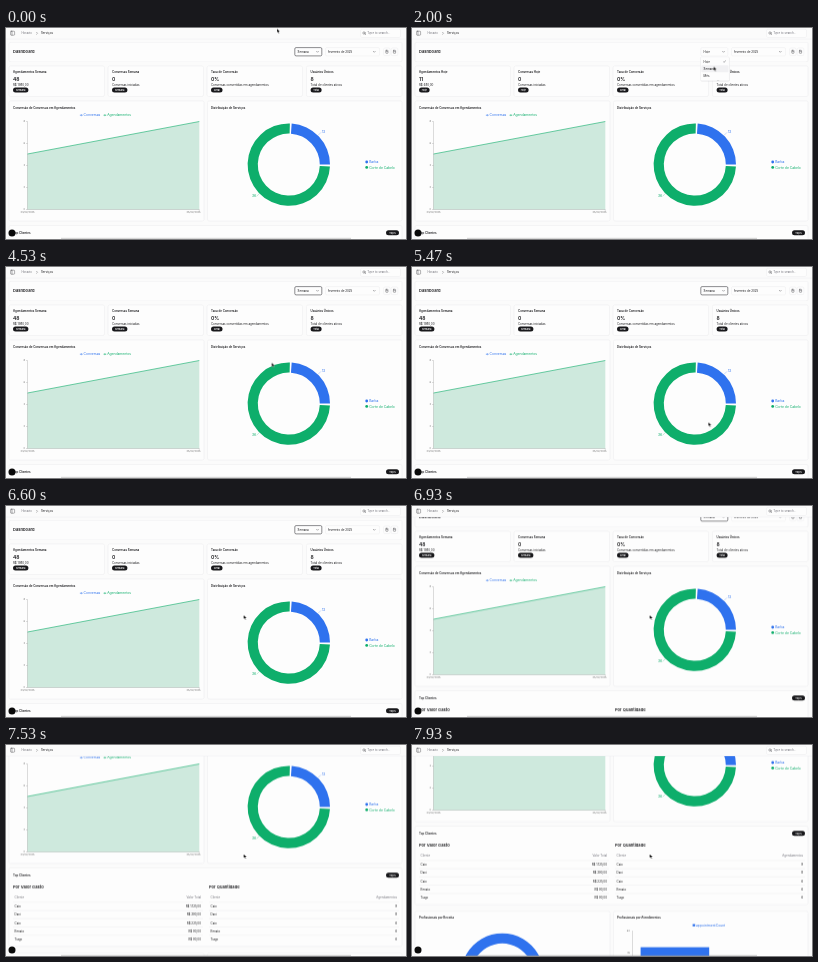
Animation, 400 px wide and 211 px high, one loop 8000 ms. Source, as an HTML page:

```html
<!DOCTYPE html>
<html lang="pt-BR">
<head>
<meta charset="utf-8">
<title>Dashboard</title>
<style>
  html, body { margin: 0; width: 100%; height: 100%; overflow: hidden; background: #fbfbfb; }
  svg { display: block; width: 100vw; height: 100vh; font: 2.92px Inter, sans-serif; fill: #18181b; }
  .b { font-weight: 600; }
  .mute { fill: #71717a; }
  .blue { fill: #2f72ee; }
  .green { fill: #0eae6b; }
  .white { fill: #fff; }
  .card { fill: #fdfdfd; stroke: #e4e4e7; stroke-width: .35; }
  .line { fill: none; stroke: #e4e4e7; stroke-width: .3; }
  .icon { fill: none; stroke: #3f3f46; stroke-width: .4; stroke-linecap: round; stroke-linejoin: round; }
  .axis { fill: none; stroke: #777; stroke-width: .25; }
  .legend { font-size: 3.33px; }
  .tick { font-size: 2.5px; fill: #777; }
  .end { text-anchor: end; }
  .mid { text-anchor: middle; }

  .week, .today, .menu, .open2, .tip, .focus, #page, #cursor { animation: 8s linear infinite; }
  .week, .today, .menu, .open2, .focus { animation-timing-function: step-end; }
  .week { animation-name: week; }
  .today { animation-name: today; }
  .menu { animation-name: menu; }
  .open2 { animation-name: open2; }
  .focus { animation-name: focus; }
  .tip { animation-name: tip; }
  #page { animation-name: scroll; }
  #cursor { animation-name: point; }

  @keyframes week { 0% { opacity: 1 } 13.4% { opacity: 0 } 29.2% { opacity: 1 } }
  @keyframes today { 0% { opacity: 0 } 13.4% { opacity: 1 } 29.2% { opacity: 0 } }
  @keyframes menu { 0% { opacity: 0 } 7.5% { opacity: 1 } 13.4% { opacity: 0 } 21.7% { opacity: 1 } 29.2% { opacity: 0 } }
  @keyframes focus { 0% { opacity: 1 } 7.5% { opacity: 0 } 13.4% { opacity: 1 } 21.7% { opacity: 0 } 29.2% { opacity: 1 } }
  @keyframes open2 { 0% { transform: translateY(0) } 10.8% { transform: translateY(-7.2px) } 21.7% { transform: translateY(-7.2px) } 23.4% { transform: translateY(0) } }
  @keyframes tip {
    0%, 34.2% { opacity: 0; transform: translateY(-12px) }
    35.8% { opacity: 1; transform: translateY(-8px) }
    39%, 52% { opacity: 1; transform: none }
    53.3%, 100% { opacity: 0; transform: translateY(-3px) }
  }
  @keyframes scroll {
    0%, 83.3% { transform: none; animation-timing-function: cubic-bezier(.35, 0, .8, .7) }
    90% { transform: translateY(-39.7px) }
    99.1%, 100% { transform: translateY(-116.4px) }
  }
  @keyframes point {
    0%, .9% { transform: translate(271px, .6px); animation-timing-function: ease-in-out }
    5.8%, 8.1% { transform: translate(302px, 23px); animation-timing-function: ease-in-out }
    11.6%, 14.4% { transform: translate(300px, 32px); animation-timing-function: ease-in-out }
    18.5%, 21.9% { transform: translate(302px, 23px); animation-timing-function: ease-in-out }
    24.6%, 29.4% { transform: translate(301.6px, 38.5px); animation-timing-function: ease-in }
    33.4% { transform: translate(190px, 92px); animation-timing-function: ease-out }
    38.5% { transform: translate(152px, 112px); animation-timing-function: ease-in-out }
    44%, 49% { transform: translate(157.8px, 111.3px); animation-timing-function: ease-in-out }
    56.3%, 58% { transform: translate(265.6px, 95.6px); animation-timing-function: ease-in }
    62% { transform: translate(305px, 110px) }
    66.5% { transform: translate(311px, 148px) }
    71% { transform: translate(276px, 165px) }
    75.5% { transform: translate(250px, 142px); animation-timing-function: ease-out }
    79.1%, 100% { transform: translate(237.6px, 109px) }
  }
</style>
</head>
<body>
<svg viewBox="0 0 400 211" preserveAspectRatio="none">
  <defs>
    <linearGradient id="shade" x2="0" y2="1">
      <stop stop-color="#999" stop-opacity="0"/>
      <stop offset="1" stop-color="#999" stop-opacity=".55"/>
    </linearGradient>
  </defs>
  <rect width="400" height="211" fill="#fbfbfb"/>
  <g id="page"></g>

  <g id="header">
    <rect width="400" height="11" fill="#fbfbfb"/>
    <path class="line" d="M0 11H400"/>
    <rect class="icon" x="4.6" y="3.2" width="4" height="4" rx=".6"/>
    <path class="icon" d="M6 3.2v4"/>
    <text class="mute" x="15.4" y="6.4">Horavix</text>
    <path class="icon" d="M30.6 4.4l.9 .9-.9 .9"/>
    <text x="35" y="6.4">Serviços</text>
    <rect class="card" x="354.5" y="1.2" width="40" height="8.3" rx="1.5"/>
    <circle class="icon" cx="358" cy="5" r="1.2"/>
    <path class="icon" d="M358.9 5.9l.8 .8"/>
    <text class="mute" x="361.3" y="6.4">Type to search...</text>
  </g>

  <circle cx="6" cy="205" r="3.5" fill="#0a0a0a"/>
  <rect x="55" y="209.2" width="290" height="1.8" fill="url(#shade)"/>
  <path id="cursor" d="M0 0V4.1L1 3.2 1.7 4.7 2.4 4.4 1.7 3H3Z" fill="#000" stroke="#fff" stroke-width=".3"/>
</svg>
<script>
const text = (x, y, s, cls = '', size) =>
  `<text x="${x}" y="${y}" class="${cls}"${size ? ` style="font-size:${size}px"` : ''}>${s}</text>`;
const rect = (x, y, w, h, cls, r = 0) =>
  `<rect x="${x}" y="${y}" width="${w}" height="${h}" rx="${r}" class="${cls}"/>`;
const path = (d, cls) => `<path d="${d}" class="${cls}"/>`;
const card = (x, y, w, h) => rect(x, y, w, h, 'card', 1.6);
const pill = (x, y, w, s) =>
  rect(x, y, w, 5, '', 2.5) + text(x + w / 2, y + 3.4, s, 'white b mid', 2.4);
const chevron = (x, y) => path(`M${x} ${y}l1 1 1-1`, 'icon');
const byPeriod = draw =>
  `<g class="week">${draw('Semana')}</g><g class="today">${draw('Hoje')}</g>`;

// Ring slice; angles in degrees, counterclockwise from the right.
function slice(cx, cy, from, to, cls, outer = 41.2, inner = 31) {
  const at = (r, a) => {
    const t = a * Math.PI / 180;
    return `${(cx + r * Math.cos(t)).toFixed(2)} ${(cy - r * Math.sin(t)).toFixed(2)}`;
  };
  const big = to - from > 180 ? 1 : 0;
  return path(`M${at(outer, from)}A${outer} ${outer} 0 ${big} 0 ${at(outer, to)}` +
    `L${at(inner, to)}A${inner} ${inner} 0 ${big} 1 ${at(inner, from)}Z`, cls);
}

function toolbar() {
  return card(3, 14.3, 393, 19.5) + text(7, 25.3, 'Dashboard', 'b', 4.1) +
    rect(288.8, 19.6, 27, 8.3, 'card', 1.3) +
    '<rect class="focus" x="288.8" y="19.6" width="27" height="8.3" rx="1.3" fill="none" stroke="#27272a" stroke-width=".5"/>' +
    byPeriod(p => text(291.6, 24.8, p)) + chevron(310.5, 23.3) +
    rect(319.5, 19.6, 54, 8.3, 'card', 1.3) + text(322, 24.8, 'fevereiro de 2025') + chevron(367.3, 23.3) +
    [377.6, 385.2].map(x => rect(x, 20, 6.6, 7.6, 'card', 1.3) +
      rect(x + 2.2, 22.3, 2.2, 3, 'icon', .4) + path(`M${x + 2.6} 23.6h1.4`, 'icon')).join('');
}

function stats() {
  const week = { Semana: ['48', 'R$ 1980,00', 15.4], Hoje: ['11', 'R$ 480,00', 10.6] };
  const stat = (x, title, value, note, badge, w) =>
    text(x, 44.8, title, 'b') + text(x, 52.6, value, 'b', 5) + text(x, 57.5, note) + pill(x, 59.5, w, badge);
  return [3, 102, 201, 300.5].map(x => card(x, 38, 95.5, 30.5)).join('') +
    byPeriod(p => {
      const [count, money, w] = week[p];
      return stat(7, 'Agendamentos ' + p, count, money, p, w) +
        stat(106, 'Conversas ' + p, '0', 'Conversas iniciadas', p, w);
    }) +
    stat(205, 'Taxa de Conversão', '0%', 'Conversas convertidas em agendamentos', 'Geral', 11.5) +
    stat(304.6, 'Usuários Únicos', '8', 'Total de clientes ativos', 'Total', 11);
}

function lineKey(x, color) {
  return `<g fill="none" stroke="${color}" stroke-width=".4"><path d="M${x} 87.2h3"/><circle cx="${x + 1.5}" cy="87.2" r=".6"/></g>`;
}

function areaChart() {
  const ticks = [8, 6, 4, 2, 0].map(v => {
    const y = 181.5 - v * 11;
    return text(19, y + .9, v, 'tick end') + path(`M20 ${y}h1.5`, 'axis');
  }).join('');
  return card(3, 73, 195, 120) + text(7, 80.6, 'Conversão de Conversas em Agendamentos', 'b') +
    lineKey(73.8, '#2f72ee') + text(77.6, 88.4, 'Conversas', 'blue legend') +
    lineKey(97.4, '#0eae6b') + text(101.2, 88.4, 'Agendamentos', 'green legend') +
    '<path d="M21.5 181.5V126L193.3 93.5v88Z" fill="#cee9dd"/>' +
    '<path d="M21.5 126L193.3 93.5" fill="none" stroke="#0eae6b" stroke-width=".6"/>' +
    path('M21.5 93.5v88H193.3v1.3', 'axis') + ticks +
    text(21.5, 185.4, '24/02/2025', 'tick mid') + text(187.5, 185.4, '25/02/2025', 'tick mid');
}

function servicePie() {
  const cx = 282.8, cy = 136.6;
  return card(201.5, 73, 194.5, 120) + text(205, 80.6, 'Distribuição de Serviços', 'b') +
    slice(cx, cy, 0, 86, 'blue') + slice(cx, cy, 88.5, 357.5, 'green') +
    '<path d="M312 107.4l3-3" stroke="#2f72ee" stroke-width=".25"/><path d="M253.5 165.4l-3 3" stroke="#0eae6b" stroke-width=".25"/>' +
    text(316, 105.4, '12', 'blue legend') + text(250, 168.6, '36', 'green legend end') +
    '<circle cx="360.7" cy="134" r="1.4" class="blue"/><circle cx="360.7" cy="139.4" r="1.4" class="green"/>' +
    text(363.2, 135.2, 'Barba', 'blue legend') + text(363.2, 140.6, 'Corte de Cabelo', 'green legend');
}

function table(x, right, title, column, values) {
  const names = ['Caio', 'Davi', 'Caio', 'Renato', 'Tiago'];
  return text(x, 217.6, title, 'b', 4.1) +
    text(x + 1.6, 228, 'Cliente', 'mute') + text(right, 228, column, 'mute end') +
    names.map((name, i) => {
      const y = 237.1 + i * 8.25;
      return path(`M${x} ${y - 5.3}H${right + 2}`, 'line') +
        text(x + 1.6, y, name) + text(right, y, values[i], 'end');
    }).join('');
}

function clients() {
  return card(3, 197.5, 393, 78.5) + text(7, 206, 'Top Clientes', 'b') + pill(380, 202.3, 13, 'Top 5') +
    table(7, 195, 'Por Valor Gasto', 'Valor Total', ['1.125', '390', '225', '90', '90'].map(v => `R$ ${v},00`)) +
    table(203, 391, 'Por Quantidade', 'Agendamentos', [9, 8, 6, 6, 6]);
}

function staff() {
  return card(3, 282.7, 195, 120) + text(7, 289.6, 'Profissionais por Receita', 'b') +
    slice(90.3, 345.8, 0, 359.9, 'blue') +
    card(201.5, 282.7, 194.5, 120) + text(205, 289.6, 'Profissionais por Atendimentos', 'b') +
    rect(280.6, 295.5, 2.6, 2.2, 'blue') + text(284, 297.8, 'appointmentCount', 'blue legend') +
    text(218, 302.9, '60', 'tick end') + text(218, 324.9, '45', 'tick end') +
    path('M220.5 302v88', 'axis') + rect(228.6, 318.6, 68.6, 71, 'blue');
}

function tooltip() {
  const field = (y, label, value) =>
    text(167.6, y, label, 'mute', 2.4) + text(167.6, y + 5.4, value, 'b');
  return '<g class="tip"><path d="M193.3 93.5v88" stroke="#ccc" stroke-width=".25"/>' +
    rect(165.5, 104.2, 25.6, 35.3, 'card', 1.3) + field(109, 'DATA', '25/02/2025') +
    field(120.4, 'CONVERSAS', '0') + field(131.8, 'AGENDAMENTOS', '8') + '</g>';
}

function menu() {
  const check = y => path(`M311.3 ${y}l.8 .8 1.5-1.8`, 'icon');
  return '<g class="menu"><rect x="288.4" y="29.4" width="29.4" height="24" rx="1.4" fill="#000" opacity=".07"/>' +
    rect(288.4, 28.8, 29, 24, 'card', 1.3) +
    '<rect class="open2" x="289.4" y="37.2" width="27" height="7" rx=".8" fill="#f1f1f3"/>' +
    ['Hoje', 'Semana', 'Mês'].map((s, i) => text(291.6, 34.5 + i * 7.2, s)).join('') +
    `<g class="week">${check(40.8)}</g><g class="today">${check(33.6)}</g></g>`;
}

document.getElementById('page').innerHTML =
  [toolbar, stats, areaChart, servicePie, clients, staff, tooltip, menu].map(draw => draw()).join('');
</script>
</body>
</html>
```
